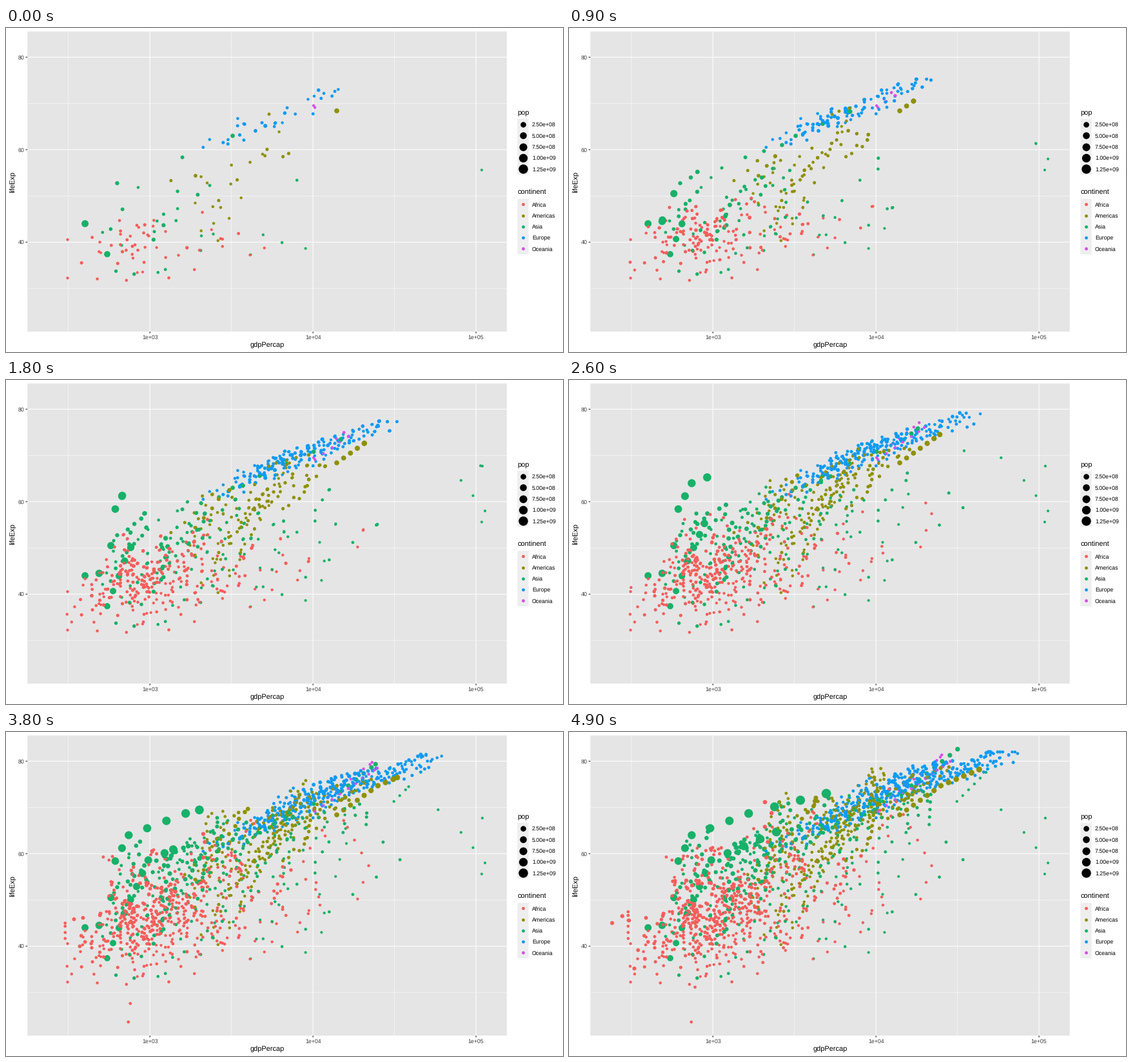
Animation of 864x504 px, one loop 5 s. Source, as a matplotlib script:

```python
import math

import numpy as np
import matplotlib.pyplot as plt
from matplotlib.animation import FuncAnimation
from matplotlib.colors import to_rgba
from matplotlib.patches import Rectangle

W, H, DPI = 864, 504, 72
FRAMES, INTERVAL = 50, 100
YEARS = np.arange(1952, 2008, 5)
rng = np.random.default_rng(7)
u = np.linspace(0, 1, len(YEARS))
eased = 1 - (1 - u) ** 1.35

COLORS = {"Africa": "#F35E5A", "Americas": "#8F9104", "Asia": "#17B169",
          "Europe": "#0E9BF3", "Oceania": "#DB4EEB"}
LEFT, TOP, RIGHT, BOTTOM = 33.2, 5.5, 776.8, 472.3
LOG_GDP_MIN, LOG_GDP_MAX = 2.2486, 5.1887
LIFE_MIN, LIFE_MAX = 20.65, 85.55


def stage_x(log_gdp):
    return LEFT + (RIGHT - LEFT) * (log_gdp - LOG_GDP_MIN) / (LOG_GDP_MAX - LOG_GDP_MIN)


def stage_y(life):
    return BOTTOM - (BOTTOM - TOP) * (life - LIFE_MIN) / (LIFE_MAX - LIFE_MIN)


def diameter(millions):
    return 4.0 + 10.7 * np.sqrt(np.asarray(millions) / 1318)


def country(continent, log_gdp, life, pop, pop_growth):
    sizes = diameter(pop * pop_growth ** u)
    return continent, np.column_stack([stage_x(log_gdp), stage_y(life), sizes])


def track(continent, pop, pop_growth, *keys):
    """A path through a few (year, gdp, life) keys."""
    years, gdp, life = np.array(keys).T
    return country(continent, np.interp(YEARS, years, np.log10(gdp)),
                   np.interp(YEARS, years, life), pop, pop_growth)


def draw_value(mean, sd):
    return mean + sd * np.clip(rng.normal(), -1.9, 1.9)


def region(continent, count, wealth, life, growth, late_life, pop, pop_growth,
           wobble=.02, boom=0, setback=(0, 0)):
    """Random countries: (mean, sd) for wealth, (mean, slope, sd) for life."""
    made = []
    for _ in range(count):
        start = draw_value(*wealth)
        gain = draw_value(*growth)
        drift = np.cumsum(rng.normal(0, wobble, len(u)))
        drift -= drift[0] + u * (drift[-1] - drift[0])
        log_gdp = start + gain * eased + boom * np.sin(np.pi * u) + drift
        first = draw_value(life[0] + life[1] * (start - wealth[0]), life[2])
        offset = start + gain - wealth[0] - growth[0]
        last = draw_value(late_life[0] + late_life[1] * offset, late_life[2])
        years_lived = first + (last - first) * eased
        years_lived += draw_value(*setback) * np.clip((u - .65) / .35, 0, 1)
        people = pop * math.exp(draw_value(0, .9))
        made.append(country(continent, np.maximum(log_gdp, 2.48),
                            np.minimum(years_lived, 82), people, pop_growth))
    return made


early = [
    track("Asia", 556, 2.37, (1952, 400, 44), (1957, 576, 50.5), (1962, 488, 44.5),
          (1967, 613, 58.4), (1977, 741, 64), (1982, 962, 65.5), (1992, 1656, 68.7),
          (2007, 4959, 73)),
    track("Africa", 14, 4.6, (1952, 781, 39.1), (1977, 796, 47.8), (2002, 241, 45),
          (2007, 278, 46.5)),
    track("Asia", 372, 3, (1952, 547, 37.4), (1967, 701, 47.2), (1987, 977, 58.6),
          (2007, 2452, 64.7)),
    track("Asia", 86, 1.5, (1952, 3217, 63), (1972, 14779, 73.4), (2007, 31656, 82.6)),
    track("Asia", .2, 15, (1952, 108382, 55.6), (1957, 113523, 58), (1967, 80895, 64.6),
          (1972, 109348, 67.7), (1982, 31354, 71.3), (2007, 47307, 77.6)),
]
late = [
    track("Africa", 1, 6, (1952, 2388, 42.7), (1967, 18773, 50.2), (1977, 21951, 57.4),
          (2007, 12057, 74)),
    track("Africa", 2.5, 3.5, (1952, 493, 40), (1982, 882, 46.2), (1992, 737, 23.6),
          (2007, 863, 46.2)),
    track("Asia", 4, 7, (1952, 6460, 39.9), (1977, 34168, 58.7), (1987, 21198, 66.3),
          (2007, 21655, 72.8)),
    track("Americas", 157, 1.9, (1952, 13990, 68.4), (1982, 25010, 74.7),
          (2007, 42952, 78.2)),
]
middle = (
    region("Africa", 45, (2.97, .25), (39, 6, 4), (.14, .2), (58, 10, 5), 4, 3.7,
           wobble=.05, boom=.08, setback=(-4.5, 5))
    + region("Africa", 4, (3.55, .08), (38, 0, 5), (.3, .2), (58, 0, 6), 2, 3.7,
             wobble=.07, boom=.15)
    + region("Americas", 24, (3.49, .19), (53, 18, 6.5), (.4, .18), (73, 7, 2.5), 7, 2.8)
    + region("Asia", 24, (3.06, .26), (45, 14, 6), (.62, .3), (69.5, 9, 2.5), 14, 2.8)
    + region("Asia", 4, (3.8, .15), (45, 8, 4), (.4, .15), (72, 5, 3), 1, 5, wobble=.04)
    + region("Europe", 30, (3.68, .25), (65.3, 14, 1.8), (.66, .1), (77.8, 8, 1.1), 10, 1.25)
    + region("Oceania", 2, (4.01, .01), (69.2, 0, .2), (.46, .07), (80.7, 0, .5), 5, 2.1,
             wobble=.005))
countries = early + [middle[i] for i in rng.permutation(len(middle))] + late
paths = np.array([path for _, path in countries])
hues = np.array([to_rgba(COLORS[name]) for name, _ in countries])

plt.rcParams.update({"font.family": "Liberation Sans", "text.hinting": "none"})
fig = plt.figure(figsize=(W / DPI, H / DPI), dpi=DPI, facecolor="white")
ax = fig.add_axes([0, 0, 1, 1])
ax.set(xlim=(0, W), ylim=(H, 0))
ax.axis("off")


def box(x, y, w, h, color):
    ax.add_patch(Rectangle((x, y), w, h, fc=color, lw=0, zorder=0, snap=False))


def line(xs, ys, width, color="white"):
    ax.plot(xs, ys, color=color, lw=width, solid_capstyle="butt", zorder=1, snap=False)


def label(x, y, text, size=8.8, color="black", ha="left", **kw):
    ax.text(x, y, text, fontsize=size, color=color, ha=ha, va="baseline", **kw)


def legend(title, baseline, top, entries):
    label(793.3, baseline, title, 11)
    for i, (text, size, color) in enumerate(entries):
        y = top + 17.28 * (i + .5)
        box(793.3, y - 8.64, 17.28, 17.28, "#EEEEEE")
        ax.scatter([801.9], [y], s=size ** 2, c=color, linewidths=0, zorder=3)
        label(816, y + 3.2, text)


box(LEFT, TOP, RIGHT - LEFT, BOTTOM - TOP, "#E5E5E5")
for log_gdp in (2.5, 3.5, 4.5):
    line([stage_x(log_gdp)] * 2, [TOP, BOTTOM], .53)
for life in (30, 50, 70):
    line([LEFT, RIGHT], [stage_y(life)] * 2, .53)
for log_gdp in (3, 4, 5):
    x = stage_x(log_gdp)
    line([x, x], [TOP, BOTTOM], 1.07)
    line([x, x], [BOTTOM, BOTTOM + 2.75], 1.07, "#222222")
    label(x, 484.2, f"1e+0{log_gdp}", color="#3D3D3D", ha="center")
for life in (40, 60, 80):
    y = stage_y(life)
    line([LEFT, RIGHT], [y, y], 1.07)
    line([LEFT - 2.75, LEFT], [y, y], 1.07, "#222222")
    label(28.2, y + 3.2, str(life), color="#3D3D3D", ha="right")
label(405, 497, "gdpPercap", 11, ha="center")
label(13.5, 239, "lifeExp", 11, ha="center", rotation=90, rotation_mode="anchor")
legend("pop", 135.3, 141.5,
       [(f"{m * 1e6:.2e}", diameter(m), "black") for m in range(250, 1251, 250)])
legend("continent", 259, 265.7, [(name, 4.9, color) for name, color in COLORS.items()])

dots = ax.scatter([], [], linewidths=0, zorder=2)


def draw(frame):
    """Past surveys stay; the current state glides between surveys."""
    time = (len(YEARS) - 1) * frame / (FRAMES - 1)
    past = math.ceil(time)
    k = min(int(time), len(YEARS) - 2)
    now = paths[:, k] + (paths[:, k + 1] - paths[:, k]) * (time - k)
    shown = np.vstack([paths[:, :past].reshape(-1, 3), now])
    dots.set_offsets(shown[:, :2])
    dots.set_sizes(shown[:, 2] ** 2)
    dots.set_facecolors(np.vstack([np.repeat(hues, past, axis=0), hues]))
    return (dots,)


anim = FuncAnimation(fig, draw, frames=FRAMES, interval=INTERVAL,
                     init_func=lambda: draw(0), repeat=True, repeat_delay=0)
plt.show()
```
